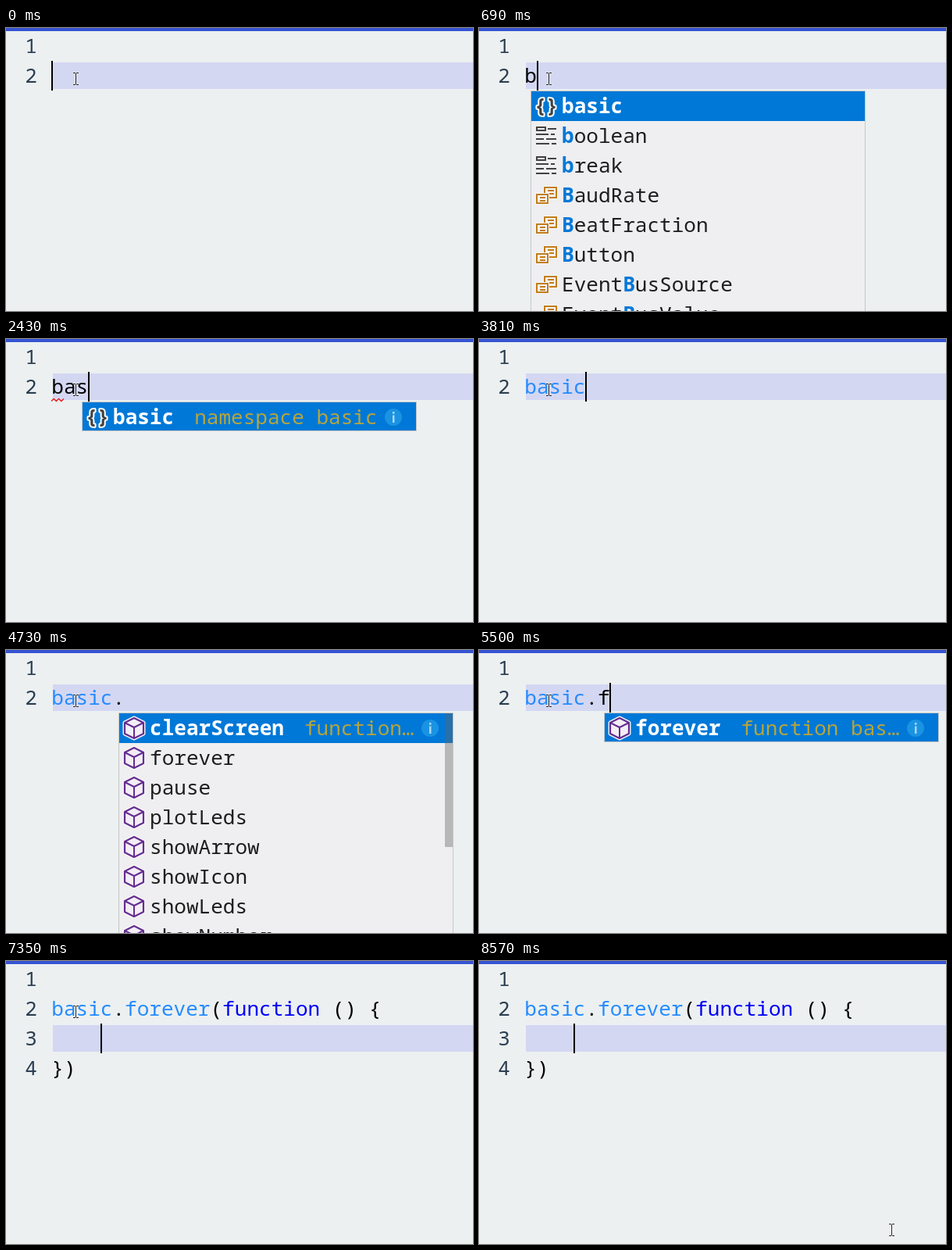
These frames come from a looping animation (598x362 px, 8.65 s). An HTML page with a canvas:

```html
<!DOCTYPE html>
<html lang="en">
<head>
<meta charset="utf-8">
<title>Code completion</title>
<style>
html, body { margin: 0; width: 100%; height: 100%; overflow: hidden; background: #ecf0f1; }
canvas { display: block; }
</style>
</head>
<body>
<canvas id="stage" width="598" height="362"></canvas>
<script>
const ctx = document.getElementById('stage').getContext('2d');
const W = 598, H = 362, LOOP = 8650;
const CW = 15.63, ROW = 38, LEFT = 58;
const FACE = '26.05px "Noto Sans Mono", "DejaVu Sans Mono", monospace';
const INK = '#000', NAME = '#268cff', KEYWORD = '#0000f8', BLUE = '#0078d7';

// Completion lists: [icon, label, highlighted letter positions]
const typedB = [
  ['space', 'basic', []], ['word', 'boolean', [0]], ['word', 'break', [0]],
  ['enum', 'BaudRate', [0]], ['enum', 'BeatFraction', [0]], ['enum', 'Button', [0]],
  ['enum', 'EventBusSource', [5]], ['enum', 'EventBusValue', [5]]
];
const typedBa = [
  ['space', 'basic', []], ['enum', 'BaudRate', [0, 1]], ['word', 'boolean', [0, 5]],
  ['word', 'break', [0, 3]], ['enum', 'BeatFraction', [0, 2]],
  ['enum', 'EventBusValue', [5, 9]], ['enum', 'NumberFormat', [3, 10]], ['word', 'abstract', [1, 5]]
];
const members = ['clearScreen', 'forever', 'pause', 'plotLeds', 'showArrow', 'showIcon', 'showLeds', 'showNumber']
  .map(name => ['cube', name, []]);
const basicOnly = [typedB[0]];
const foreverOnly = [members[1]];

const call = [
  [],
  [['basic', NAME], ['.', INK], ['forever', NAME], ['(', INK], ['function', KEYWORD], [' () {', INK]],
  [],
  [['})', INK]]
];
const line = (...parts) => [[], parts];
const basic = ['basic', NAME];

// Each step overrides part of the state
const steps = [
  [0, { code: line(), row: 1, col: 0, caret: true, list: null, at: 0, bar: 0, detail: true, wave: -1 }],
  [230, { caret: false }],
  [460, { code: line(['b', INK]), col: 1, caret: true }],
  [690, { list: typedB, at: 1, detail: false }],
  [760, { detail: true, bar: 0.2 }],
  [830, { bar: 0.4 }],
  [990, { code: line(['ba', INK]), col: 2, at: 2 }],
  [1050, { list: typedBa }],
  [1440, { code: line(['bas', INK]), col: 3, at: 3, list: basicOnly, bar: 0 }],
  [1980, { caret: false }],
  [2040, { wave: 0 }],
  [2430, { caret: true }],
  [2890, { code: line(['basic', INK]), col: 5, list: null }],
  [2970, { code: line(basic) }],
  [3350, { caret: false, wave: -1 }],
  [3810, { caret: true }],
  [4200, { code: line(basic, ['.', INK]), col: 6, at: 6, list: members, bar: 0.4 }],
  [4730, { caret: false }],
  [5210, { caret: true }],
  [5500, { code: line(basic, ['.f', INK]), col: 7, at: 7, list: foreverOnly, bar: 0 }],
  [5810, { code: line(basic, ['.fo', INK]), col: 8 }],
  [5880, { at: 8 }],
  [5950, { wave: 5 }],
  [6430, { caret: false, wave: -1 }],
  [6660, { code: line(basic, ['.', INK], ['for', KEYWORD]), col: 9, at: 9, caret: true }],
  [7130, { caret: false }],
  [7350, { code: call, row: 2, col: 4, caret: true, list: null }],
  [7810, { caret: false }],
  [8270, { caret: true }]
];

function stateAt(t) {
  const s = {};
  for (const [start, change] of steps) if (start <= t) Object.assign(s, change);
  return s;
}

function box(x, y, w, h, color) {
  ctx.fillStyle = color;
  ctx.fillRect(x, y, w, h);
}

function path(points, color, width, close) {
  ctx.beginPath();
  points.forEach(([x, y]) => ctx.lineTo(x, y));
  if (close) ctx.closePath();
  ctx.strokeStyle = color;
  ctx.lineWidth = width;
  ctx.stroke();
}

// Monospaced text on a fixed grid; returns the x after the last letter
function write(str, x, y, color, bold) {
  ctx.font = (bold ? 'bold ' : '') + FACE;
  ctx.fillStyle = color;
  [...str].forEach((ch, i) => ctx.fillText(ch, x + i * CW, y));
  return x + [...str].length * CW;
}

// Icons are drawn around their centre
const icons = {
  space() {
    ctx.font = 'bold 25px "Noto Sans Mono", monospace';
    ctx.lineJoin = 'round';
    ctx.strokeStyle = '#fff';
    ctx.lineWidth = 4;
    ctx.strokeText('{', -15, 8);
    ctx.strokeText('}', 0, 8);
    ctx.fillStyle = '#424242';
    ctx.fillText('{', -15, 8);
    ctx.fillText('}', 0, 8);
  },
  word() {
    const c = '#424242';
    ctx.strokeStyle = c;
    ctx.lineWidth = 2;
    ctx.strokeRect(-12, -11, 11, 4);
    box(2, -10, 11, 2, c);
    box(-13, -3, 16, 2, c);
    box(6, -3, 5, 2, c);
    box(-13, 3, 10, 2, c);
    box(0, 3, 13, 2, c);
    box(-13, 9, 17, 2, c);
    box(7, 9, 6, 2, c);
  },
  enum() {
    const c = '#c27d1a';
    for (const [x, y, w, h] of [[-2, -10, 15, 13], [-12, -1, 14, 11]]) {
      box(x - 2, y - 2, w + 4, h + 4, '#f6f6f6');
      ctx.strokeStyle = c;
      ctx.lineWidth = 2;
      ctx.strokeRect(x, y, w, h);
      box(x + 4, y + 3, w - 7, 2, c);
      box(x + 4, y + 7, w - 7, 2, c);
    }
  },
  cube() {
    const hex = [[0, -13], [12, -7], [12, 7], [0, 13], [-12, 7], [-12, -7]];
    ctx.lineJoin = 'round';
    path(hex, '#f6f6f6', 5, true);
    ctx.fillStyle = '#f3eef6';
    ctx.fill();
    path(hex, '#652d90', 2.2, true);
    path([[-12, -7], [0, -1], [12, -7]], '#652d90', 2);
    path([[0, -1], [0, 13]], '#652d90', 2);
  }
};

function drawDetail(x, label, kind) {
  const start = x + 40 + label.length * CW + 26;
  const room = Math.floor((x + 381 - start) / CW);
  const full = kind === 'space' ? 'namespace ' + label : 'function basic.' + label + '()';
  write(full.length > room ? full.slice(0, room - 1) + '…' : full, start, 109, '#b5a53c');
  ctx.beginPath();
  ctx.arc(x + 399, 100, 11, 0, 7);
  ctx.fillStyle = '#1a93e2';
  ctx.fill();
  box(x + 398, 97.5, 2.5, 9.5, '#a9d6f5');
  box(x + 398, 93, 2.5, 2.7, '#a9d6f5');
}

function drawList(s) {
  const x = Math.round(66 + (s.at - 1) * CW);
  const single = s.list.length === 1;
  const h = single ? 38 : 300;
  box(x, 80, 429, h, '#c8c8c8');
  box(x + 1, 81, 427, h - 2, '#efeef0');
  box(x + 1, 81, 427, single ? 36 : 38, BLUE);
  s.list.forEach(([icon, label, marks], i) => {
    ctx.save();
    ctx.translate(x + 20, 100 + i * ROW);
    icons[icon]();
    ctx.restore();
    [...label].forEach((ch, k) => {
      const hit = marks.includes(k);
      write(ch, x + 40 + k * CW, 109 + i * ROW, i ? (hit ? BLUE : '#1e1e1e') : '#fff', !i || hit);
    });
  });
  if (s.detail) drawDetail(x, s.list[0][1], s.list[0][0]);
  if (s.bar) box(x + 418, 81, 10, 171, `rgba(100,100,100,${s.bar})`);
}

function drawWave(col) {
  const x = LEFT + col * CW;
  const points = [];
  for (let i = 0; i <= 5; i++) points.push([x + i * 3.2, i % 2 ? 76.5 : 79.5]);
  path(points, '#f01818', 1.3);
}

// The pointer jumps across the stage in five moves
function drawPointer(t) {
  const n = t < 8270 ? 0 : Math.min(5, 1 + Math.floor((t - 8270) / 75));
  const p = n / 5, e = p * p * (3 - 2 * p);
  const x = Math.round(89 + 439 * e), y = Math.round(65 + 279 * e);
  const beam = (grow, color) => {
    const bar = (dx, dy, w, h) =>
      box(x + dx - grow, y + dy - grow, w + 2 * grow, h + 2 * grow, color);
    bar(0, -7, 1, 14);
    bar(-3, -8, 3, 1);
    bar(1, -8, 3, 1);
    bar(-3, 7, 3, 1);
    bar(1, 7, 3, 1);
  };
  beam(0.5, 'rgba(255,255,255,.5)');
  beam(0, '#222');
}

function draw(t) {
  const s = stateAt(t);
  box(0, 0, W, H, '#ecf0f1');
  box(0, 0, W, 4, '#3653d3');
  box(60, 44 + (s.row - 1) * ROW, W - 60, 34, '#d4d7f2');
  s.code.forEach((parts, i) => {
    const y = 32 + i * ROW;
    write(String(i + 1), 24.3, y, '#2b3e50');
    let x = LEFT + 0.3;
    for (const [str, color] of parts) x = write(str, x, y, color);
  });
  if (s.wave >= 0) drawWave(s.wave);
  if (s.caret) box(Math.round(LEFT + s.col * CW), 4 + s.row * ROW, 2, 38, '#000');
  if (s.list) drawList(s);
  drawPointer(t);
}

function tick(now) {
  draw(now % LOOP);
  requestAnimationFrame(tick);
}
draw(0);
requestAnimationFrame(tick);
</script>
</body>
</html>
```
